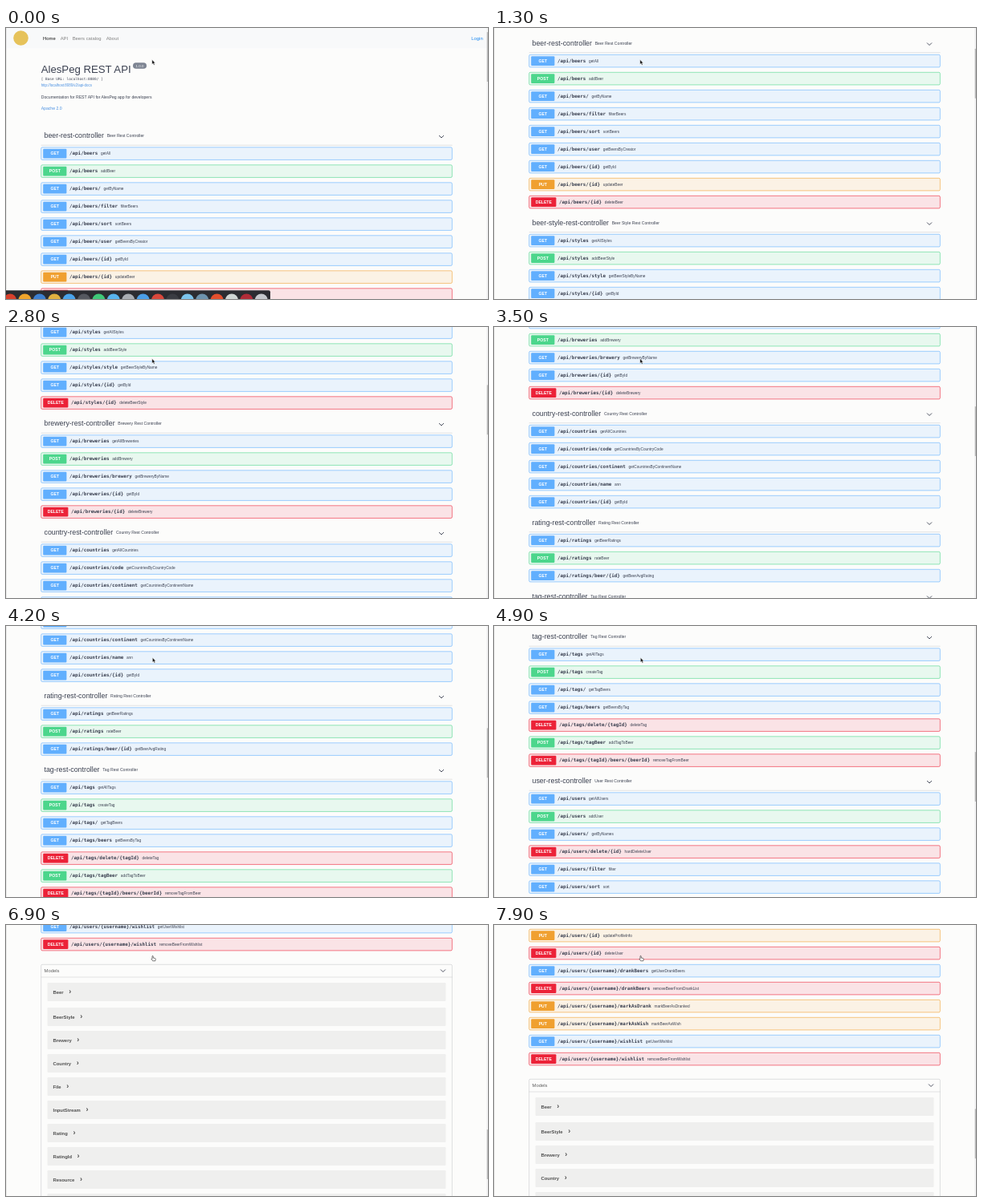
These frames come from a looping animation (600x338 px, 8000 ms). An HTML page:

```html
<!DOCTYPE html>
<html lang="en">
<head>
<meta charset="utf-8">
<title>REST API documentation</title>
<style>
  html, body { margin: 0; width: 100%; height: 100%; overflow: hidden; background: #fcfcfb; }
  svg { display: block; width: 600px; height: 338px; font-family: "Liberation Sans", Arial, sans-serif; fill: #3b4151; }
  .mono { font-family: "DejaVu Sans Mono", monospace; }
  .bold { font-weight: bold; }
  .line { fill: none; stroke: #3b4151; }
</style>
</head>
<body>
<svg viewBox="0 0 600 338">
  <g id="page"></g>
  <path d="M.4 0V338" stroke="#d4d4d4" stroke-width=".6"/>
  <rect x="598.4" width="1.6" height="338" fill="#eeeeee"/>
  <rect id="thumb" x="598.7" width="1.3" height="62" rx=".5" fill="#b4b4b4"/>
  <g id="dock"></g>
  <path id="arrow" d="M0 0V5.6L1.3 4.5L2.3 6.7L3.3 6.2L2.3 4.1H4Z" fill="#111" stroke="#fff" stroke-width=".4"/>
  <path id="hand" d="M1.5 0Q2.2 0 2.2 .8V2.6L4.6 3.1Q5.3 3.3 5.2 4.2L4.8 6.4H1.7L0 4.1Q.2 3.4 1 3.9V.8Q1 0 1.5 0Z"
        fill="#fff" stroke="#222" stroke-width=".6"/>
</svg>
<script>
const METHODS = {
  GET: ['#61affe', 29.2], POST: ['#4cd68c', 29.2], PUT: ['#f0a030', 29.2], DELETE: ['#ec2238', 31.2]
};

// Each operation: method, path below /api/, operation name
const SECTIONS = {
  'Beer': `GET beers getAll|POST beers addBeer|GET beers/ getByName|GET beers/filter filterBeers
    |GET beers/sort sortBeers|GET beers/user getBeersByCreator|GET beers/{id} getById
    |PUT beers/{id} updateBeer|DELETE beers/{id} deleteBeer`,
  'Beer Style': `GET styles getAllStyles|POST styles addBeerStyle|GET styles/style getBeerStyleByName
    |GET styles/{id} getById|DELETE styles/{id} deleteBeerStyle`,
  'Brewery': `GET breweries getAllBreweries|POST breweries addBrewery|GET breweries/brewery getBreweryByName
    |GET breweries/{id} getById|DELETE breweries/{id} deleteBrewery`,
  'Country': `GET countries getAllCountries|GET countries/code getCountriesByCountryCode
    |GET countries/continent getCountriesByContinentName|GET countries/name ann|GET countries/{id} getById`,
  'Rating': `GET ratings getBeerRatings|POST ratings rateBeer|GET ratings/beer/{id} getBeerAvgRating`,
  'Tag': `GET tags getAllTags|POST tags createTag|GET tags/ getTagBeers|GET tags/beers getBeersByTag
    |DELETE tags/delete/{tagId} deleteTag|POST tags/tagBeer addTagToBeer
    |DELETE tags/{tagId}/beers/{beerId} removeTagFromBeer`,
  'User': `GET users getAllUsers|POST users addUser|GET users/ getByNames|DELETE users/delete/{id} hardDeleteUser
    |GET users/filter filter|GET users/sort sort|GET users/username/{username} getUserByUsername
    |PUT users/username/{username} updateProfileInfoByUserName|GET users/{id} getById
    |PUT users/{id} updateProfileInfo|DELETE users/{id} deleteUser
    |GET users/{username}/drankBeers getUserDrankBeers|DELETE users/{username}/drankBeers removeBeerFromDrankList
    |PUT users/{username}/markAsDrank markBeerAsDranked|PUT users/{username}/markAsWish markBeerAsWish
    |GET users/{username}/wishlist getUserWishlist|DELETE users/{username}/wishlist removeBeerFromWishlist`
};
const MODELS = 'Beer BeerStyle Brewery Country File InputStream Rating RatingId Resource Tag URI URL User'.split(' ');
const DOCK = ['#d8402c', '#f0a52c', '#3d7fd0', '#e0b040', '#4aa3ea', '#55585f', '#3fc878', '#58b4ee', '#a9adb3',
  '#4b9fe8', '#d9483c', '#3a3c42', '#7cc4ec', '#6d93ad', '#e4502e', '#cfd6d4', '#b02c38', '#c4c8cc'];

// [time, scroll offset, speed in px/ms]
const SCROLL = [[300, 0, .09], [2200, 259, .178], [3500, 522.5, .217], [4900, 845, .245], [5600, 1025.5, .268],
  [6900, 1388.5, .285], [7100, 1444, .25], [7200, 1444, -.25], [7900, 1245.5, -.29]];

const $ = id => document.getElementById(id);
const text = (x, y, size, content, attrs = '') =>
  `<text x="${x}" y="${y}" font-size="${size}" ${attrs}>${content}</text>`;
const rect = (x, y, w, h, attrs) => `<rect x="${x}" y="${y}" width="${w}" height="${h}" ${attrs}/>`;
const chevron = (x, y) => `<path class="line" d="M${x - 3} ${y - 1.5}l3 3l3 -3" stroke-width=".9"/>`;
const rule = y => `<path class="line" d="M43.7 ${y}H555.5" stroke-width=".4" opacity=".35"/>`;

function header() {
  const link = 'fill="#4990e2"', muted = 'fill="#808080"';
  return rect(0, 0, 600, 25.3, 'fill="#f8f9fa"')
    + '<circle cx="18.5" cy="12.5" r="9.3" fill="#e6c25a"/>'
    + text(46, 14.7, 5.88, 'Home', 'fill="#191919"') + text(67.7, 14.7, 5.88, 'API', muted)
    + text(82.7, 14.7, 5.88, 'Beers catalog', muted) + text(124.7, 14.7, 5.88, 'About', muted)
    + text(579.3, 14.7, 5.88, 'Login', 'fill="#1a88f0"')
    + text(43.7, 56.4, 13.2, 'AlesPeg REST API')
    + rect(158, 43.2, 17, 7.6, 'rx="3.8" fill="#7d8492"')
    + text(166.5, 48.6, 4.4, '1.0.0', 'fill="#fff" text-anchor="middle"')
    + text(43.7, 64.6, 4.41, '[ Base URL: localhost:8080/ ]', 'class="mono"')
    + text(43.7, 72.7, 4.41, 'http://localhost:8080/v2/api-docs', link)
    + text(43.7, 88, 5.145, 'Documentation for REST API for AlesPeg app for developers')
    + text(43.7, 101.8, 5.145, 'Apache 2.0', link);
}

function heading(name, y) {
  const slug = name.toLowerCase().replace(' ', '-');
  return text(47.5, y + 2.7, 8.82,
      `${slug}-rest-controller<tspan dx="3.7" dy="-.8" font-size="5.145">${name} Rest Controller</tspan>`)
    + chevron(542, y + 1) + rule(y + 11.7);
}

function operation(line, y) {
  const [method, path, name] = line.trim().split(' ');
  const [color, width] = METHODS[method];
  return rect(43.7, y - 7.7, 511.6, 15.6,
      `rx="1.5" fill="${color}" fill-opacity=".11" stroke="${color}" stroke-width=".6"`)
    + rect(46.2, y - 5.8, width, 11.8, `rx="1.1" fill="${color}"`)
    + text(46.2 + width / 2, y + 1.9, 5.145, method, 'class="bold" fill="#fff" text-anchor="middle"')
    + text(width + 49.8, y + 1.9, 5.88, `<tspan class="mono bold">/api/${path}</tspan>`
      + `<tspan dx="3.7" dy="-.2" font-size="4.78">${name}</tspan>`);
}

function models(y) {
  const itemY = i => y + 26.5 + 29 * i + (i ? 2 : 0);
  return rect(43.7, y - 7.7, 511.6, 400, 'class="line" rx="1.5" stroke-width=".4" stroke-opacity=".4"')
    + text(47.5, y + 2, 5.88, 'Models', 'fill="#606060"') + chevron(544, y) + rule(y + 8)
    + MODELS.map((name, i) => rect(51.5, itemY(i) - 11.5, 496, 23, 'rx="1.2" fill="#efefee"')
      + text(58.5, itemY(i) + 2, 5.88,
        `${name}<tspan dx="6.6" dy=".4" font-size="9">›</tspan>`, 'class="bold" fill="#505050"')).join('');
}

function buildPage() {
  let y = 134.5, markup = header();
  for (const [name, operations] of Object.entries(SECTIONS)) {
    markup += heading(name, y);
    for (const line of operations.split('|')) markup += operation(line, y += 22);
    y += 26;
  }
  return markup + models(y + 7);
}

function scrollAt(t) {
  if (t <= SCROLL[0][0]) return 0;
  const next = Math.max(1, SCROLL.findIndex(key => key[0] >= t));
  const [t0, y0, v0] = SCROLL[next - 1], [t1, y1, v1] = SCROLL[next];
  const d = t1 - t0, u = (t - t0) / d, w = 1 - u;
  return w * w * ((1 + 2 * u) * y0 + u * d * v0) + u * u * ((3 - 2 * u) * y1 - w * d * v1);
}

const move = (id, x, y) => $(id).setAttribute('transform', `translate(${x} ${y})`);

function draw(elapsed) {
  const t = Math.floor(elapsed % 8000 / 100) * 100; // the picture advances ten times a second
  const scroll = Math.round(scrollAt(t) * 2) / 2;
  const pointing = t >= 6200;
  move('page', 0, -scroll);
  move('thumb', 0, 5 + scroll * .18);
  move('dock', 0, Math.min(12, t * .06));
  move('arrow', t < 4200 ? 181.8 : 182.4, 39.6);
  move('hand', 181, 38.4);
  $('arrow').style.display = pointing ? 'none' : '';
  $('hand').style.display = pointing ? '' : 'none';
}

$('page').innerHTML = buildPage();
$('dock').innerHTML = rect(-5, 327.3, 334, 20, 'rx="2" fill="#2b2c31"')
  + DOCK.map((color, i) => `<circle cx="${5 + i * 18.4}" cy="339.5" r="8" fill="${color}"/>`).join('');

const start = performance.now();
function tick() {
  draw(performance.now() - start);
  requestAnimationFrame(tick);
}
tick();
</script>
</body>
</html>
```
